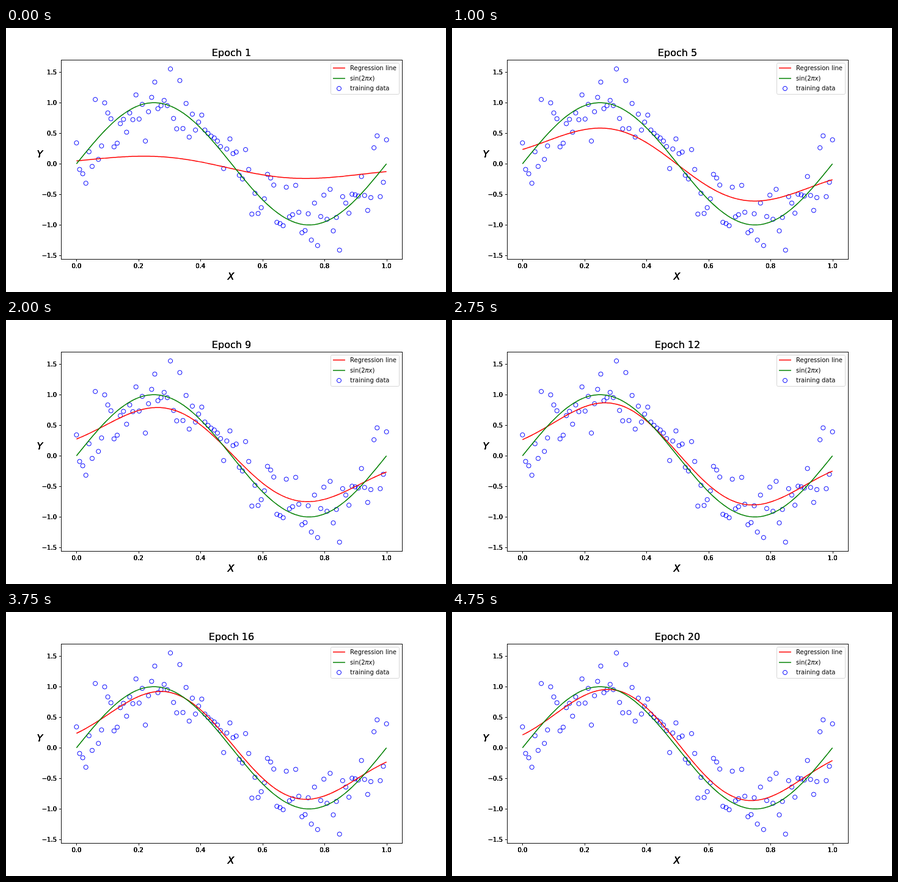
An HTML page with a canvas for the animation above (5 s loop, 720 px wide and 432 px high).

```html
<!DOCTYPE html>
<html lang="en">
<head>
<meta charset="utf-8">
<title>Regression training</title>
<style>
  html, body { margin: 0; width: 100%; height: 100%; overflow: hidden; background: #fff; }
  canvas { display: block; }
</style>
</head>
<body>
<canvas id="stage" width="720" height="432"></canvas>
<script>
const ctx = document.getElementById('stage').getContext('2d');
const EPOCH_MS = 250, EPOCHS = 20;
const FONT = '"DejaVu Sans", sans-serif';
const { sin, cos, PI } = Math;

const toX = x => 115.36 + 507.27 * x;
const toY = y => 222.2 - 100 * y;

// Heights of the evenly spaced noisy samples, in stage pixels.
const samples = [
  188, 231.5, 238.5, 254, 202.5, 226.5, 117, 215, 193, 122.5,
  139, 148.5, 194.5, 188.5, 156.5, 149.5, 170.5, 139, 150, 109.5,
  149, 125, 185, 137, 113.5, 88.5, 132, 127, 118.5, 127,
  67, 148, 165, 86, 164.5, 123.5, 178.5, 141, 167, 154,
  142.5, 167, 172.5, 177, 180, 185, 194, 230, 198, 181.5,
  205.5, 203, 241, 247, 199, 231.5, 304.5, 270.5, 303.5, 294,
  279.5, 239.5, 245.5, 257, 318, 320, 323.5, 260.5, 309, 305.5,
  257.5, 301.5, 335, 331.5, 304, 347, 286.5, 356, 308.5, 273.5,
  313, 264, 332, 310, 363.5, 276, 286.5, 303, 272, 273,
  275, 243, 274, 298.5, 277.5, 196, 176.5, 276, 252.5, 183
];

// Weights of the fitted curve's basis as training proceeds.
const basis = x => [cos(PI * x), cos(3 * PI * x), sin(2 * PI * x), 1, cos(2 * PI * x)];
const checkpoints = [
  { epoch: 1,  weights: [0.1175, -0.030, 0.076, -0.059, 0.019] },
  { epoch: 3,  weights: [0.2865, -0.089, 0.1675, -0.042, 0.009] },
  { epoch: 5,  weights: [0.371, -0.124, 0.2465, -0.013, 0] },
  { epoch: 9,  weights: [0.455, -0.185, 0.3165, 0.019, -0.014] },
  { epoch: 12, weights: [0.4715, -0.214, 0.348, 0.0295, -0.022] },
  { epoch: 16, weights: [0.473, -0.238, 0.375, 0.036, -0.0335] },
  { epoch: 20, weights: [0.465, -0.255, 0.393, 0.041, -0.041] }
];

// Local cubic interpolation in an exponentially decaying variable.
function weightsAt(epoch) {
  const decay = n => 0.84 ** n;
  const next = checkpoints.findIndex(c => c.epoch >= epoch);
  const first = Math.min(Math.max(next - 2, 0), checkpoints.length - 4);
  const near = checkpoints.slice(first, first + 4);
  const shares = near.map(p => near.reduce((share, q) => q === p ? share :
    share * (decay(epoch) - decay(q.epoch)) / (decay(p.epoch) - decay(q.epoch)), 1));
  return near[0].weights.map((_, k) =>
    near.reduce((sum, p, i) => sum + shares[i] * p.weights[k], 0));
}

function text(str, x, y, { size = 10, align = 'left', style = '', passes = 1 } = {}) {
  ctx.font = `${style} ${size}px ${FONT}`;
  ctx.textAlign = align;
  ctx.fillStyle = '#000';
  for (let i = 0; i < passes; i++) ctx.fillText(str, x, y);
  return x + ctx.measureText(str).width;
}

function line(points, color, width) {
  ctx.beginPath();
  points.forEach(([x, y]) => ctx.lineTo(x, y));
  ctx.strokeStyle = color;
  ctx.lineWidth = width;
  ctx.stroke();
}

function plot(fn, color) {
  const points = Array.from({ length: 201 }, (_, i) => [toX(i / 200), toY(fn(i / 200))]);
  line(points, color, 1.5);
}

function ring(x, y) {
  ctx.beginPath();
  ctx.arc(x, y, 3.54, 0, 2 * PI);
  ctx.strokeStyle = '#00f';
  ctx.lineWidth = 1;
  ctx.stroke();
}

function drawAxes() {
  const axisColor = '#111';
  ctx.strokeStyle = axisColor;
  ctx.lineWidth = 1;
  ctx.strokeRect(90.5, 52.5, 558, 326);
  for (let i = 0; i <= 5; i++) {
    const x = Math.round(toX(i / 5)) + 0.5;
    line([[x, 379], [x, 382]], axisColor, 1);
    text((i / 5).toFixed(1), toX(i / 5), 393, { align: 'center', passes: 4 });
  }
  for (let i = -3; i <= 3; i++) {
    const y = Math.round(toY(i / 2)) + 0.5;
    line([[87, y], [90, y]], axisColor, 1);
    text((i / 2).toFixed(1).replace('-', '\u2212'), 83, y + 3.5, { align: 'right', passes: 4 });
  }
  const label = { size: 16, align: 'center', style: 'italic', passes: 4 };
  text('X', 368, 412, label);
  text('Y', 55.5, 212, label);
}

function drawLegend() {
  ctx.beginPath();
  ctx.roundRect(531.5, 57.5, 112, 51, 2);
  ctx.fillStyle = 'rgba(255,255,255,0.8)';
  ctx.fill();
  ctx.strokeStyle = '#d6d6d6';
  ctx.lineWidth = 1;
  ctx.stroke();
  line([[535, 65.5], [555, 65.5]], '#f00', 1.5);
  line([[535, 82.5], [555, 82.5]], '#008000', 1.5);
  ring(545, 99);
  text('Regression line', 563, 69);
  let x = text('sin(2', 563, 86);
  x = text('πx', x, 86, { style: 'italic' });
  text(')', x, 86);
  text('training data', 563, 102);
}

function draw(epoch) {
  ctx.fillStyle = '#fff';
  ctx.fillRect(0, 0, 720, 432);
  samples.forEach((y, i) => ring(toX(i / 99), y));
  const weights = weightsAt(epoch);
  plot(x => basis(x).reduce((sum, b, k) => sum + b * weights[k], 0), '#f00');
  plot(x => sin(2 * PI * x), '#008000');
  drawAxes();
  text(`Epoch ${epoch}`, 369, 46, { size: 16, align: 'center', passes: 2 });
  drawLegend();
}

const start = performance.now();
function tick() {
  const elapsed = Math.max(0, performance.now() - start);
  draw(Math.floor(elapsed / EPOCH_MS) % EPOCHS + 1);
  requestAnimationFrame(tick);
}
tick();
</script>
</body>
</html>
```
